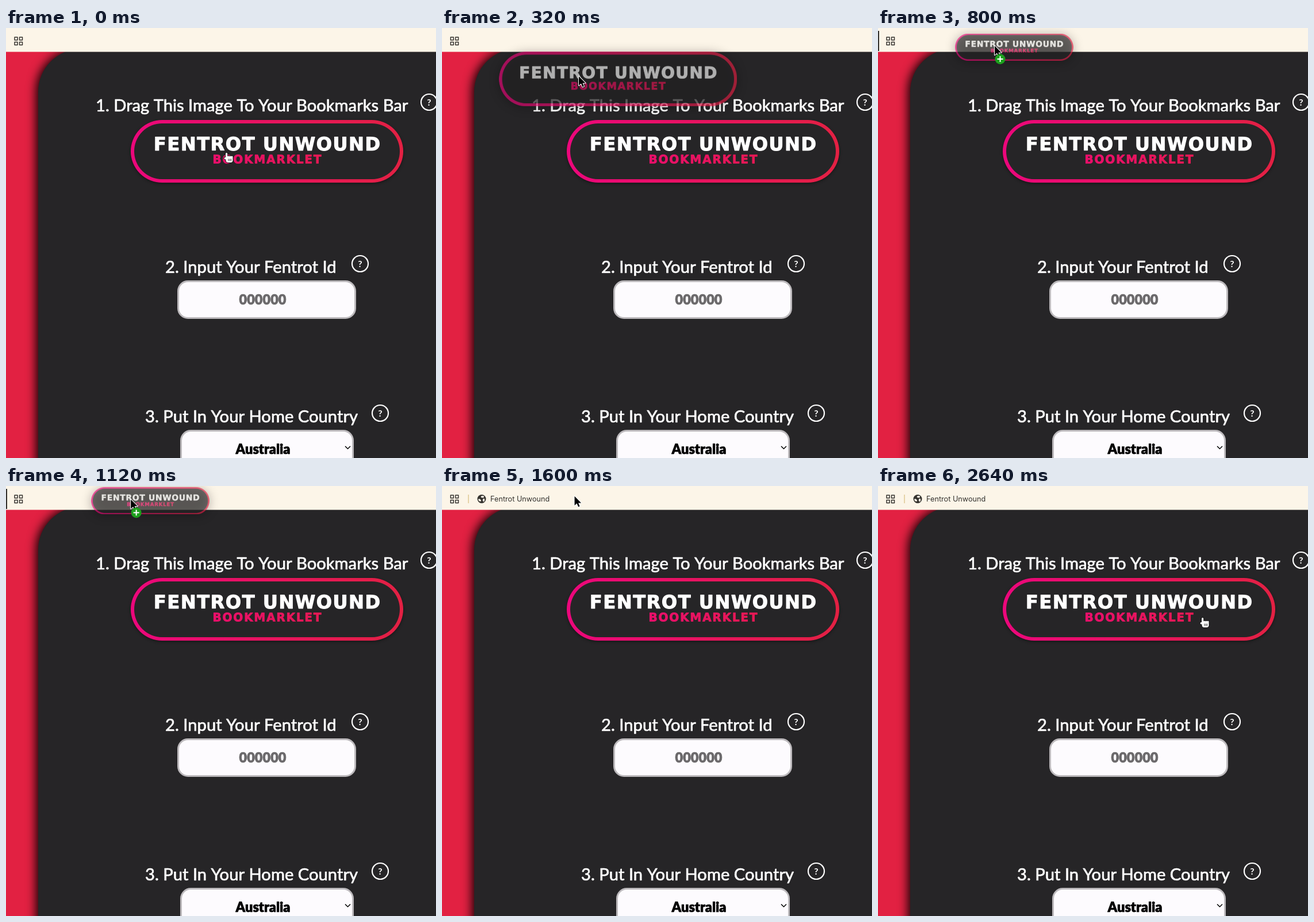
An HTML page with a canvas for the animation above (2720 ms loop, 748 by 748 pixels).

```html
<!DOCTYPE html>
<html lang="en">
<head>
<meta charset="utf-8">
<title>Drag to bookmarks bar</title>
<style>
  html, body { margin: 0; width: 100%; height: 100%; overflow: hidden; background: #262527; }
  canvas { display: block; width: 748px; height: 748px; }
</style>
</head>
<body>
<canvas id="stage" width="748" height="748"></canvas>
<script>
const ctx = document.getElementById('stage').getContext('2d');

const LOOP = 2720, STEP = 80;
const DRAG_START = 120, DROP = 1500;
const BAR_HEIGHT = 41.5;
const DARK = '#262527', CREAM = '#fcf5e8', INK = '#35332f';
const PILL = { x: 217, y: 160, w: 474, h: 109 };

const linear = k => k;
const easeIn = k => k ** 1.5;
const easeOut = k => 1 - (1 - k) ** 1.6;
const clamp = k => Math.min(1, Math.max(0, k));

// Pointer stops, each with the easing used to reach it
const STOPS = [
  { t: 80, x: 381, y: 217 },
  { t: 320, x: 238, y: 84, ease: linear },
  { t: 480, x: 203, y: 37, ease: easeOut },
  { t: 800, x: 203, y: 31, ease: linear },
  { t: 1280, x: 229, y: 17, ease: easeIn },
  { t: 1680, x: 231, y: 18, ease: linear },
  { t: 2160, x: 322, y: 166, ease: easeIn },
  { t: 2640, x: 562, y: 229, ease: easeOut }
];

function pointerAt(t) {
  const i = STOPS.findIndex(stop => stop.t >= t);
  if (i === 0) return STOPS[0];
  const from = STOPS[i - 1], to = STOPS[i];
  const k = to.ease((t - from.t) / (to.t - from.t));
  return { x: from.x + (to.x - from.x) * k, y: from.y + (to.y - from.y) * k };
}

const ghostScale = t => 1 - 0.566 * clamp((t - 160) / 640) ** 1.08;

function roundRect(c, x, y, w, h, r) {
  c.beginPath();
  c.roundRect(x, y, w, h, r);
}

function circle(x, y, r) {
  ctx.beginPath();
  ctx.arc(x, y, r, 0, Math.PI * 2);
}

function text(c, str, x, y, font, color, { align = 'center', spacing = 0, bolden = 0 } = {}) {
  c.font = font;
  c.fillStyle = c.strokeStyle = color;
  c.textAlign = align;
  c.letterSpacing = spacing + 'px';
  const left = align === 'center' ? x + spacing / 2 : x;
  c.fillText(str, left, y);
  if (bolden) {
    c.lineWidth = bolden;
    c.lineJoin = 'round';
    c.strokeText(str, left, y);
  }
  c.letterSpacing = '0px';
}

// The button is a sprite at double size, shared by page and drag image.
function makePill() {
  const sprite = document.createElement('canvas');
  sprite.width = PILL.w * 2;
  sprite.height = PILL.h * 2;
  const c = sprite.getContext('2d');
  c.scale(2, 2);
  const gradient = c.createLinearGradient(0, 0, PILL.w, 0);
  gradient.addColorStop(0, '#ec077c');
  gradient.addColorStop(1, '#e32143');
  roundRect(c, 3, 3, PILL.w - 6, PILL.h - 6, 51.5);
  c.fillStyle = DARK;
  c.fill();
  c.strokeStyle = gradient;
  c.lineWidth = 6;
  c.stroke();
  const wide = '"DejaVu Sans", Verdana, sans-serif';
  const middle = PILL.w / 2;
  text(c, 'FENTROT UNWOUND', middle, 53, `bold 32px ${wide}`, '#fff', { spacing: 1.6, bolden: 1.1 });
  text(c, 'BOOKMARKLET', middle, 75.5, `bold 20px ${wide}`, gradient, { spacing: 1.8, bolden: 0.8 });
  return sprite;
}
const pill = makePill();

function drawPill(x, y, scale, alpha, shadow, blur) {
  ctx.save();
  ctx.globalAlpha = alpha;
  ctx.shadowColor = shadow;
  ctx.shadowBlur = blur;
  ctx.shadowOffsetY = 2;
  ctx.imageSmoothingQuality = 'high';
  ctx.drawImage(pill, x, y, PILL.w * scale, PILL.h * scale);
  ctx.restore();
}

function drawPanel() {
  ctx.fillStyle = '#e22142';
  ctx.fillRect(0, 0, 748, 748);
  ctx.save();
  ctx.shadowColor = '#000';
  ctx.shadowBlur = 18;
  ctx.shadowOffsetX = -3;
  roundRect(ctx, 56, 36, 900, 900, 75);
  ctx.fillStyle = DARK;
  ctx.fill();
  ctx.restore();
}

function drawHeading(str, x, baseline, helpX) {
  text(ctx, str, x, baseline, '29.2px Lato, sans-serif', '#fff', { align: 'left', bolden: 0.7 });
  const helpY = baseline - 16;
  circle(helpX, helpY, 14);
  ctx.lineWidth = 2.2;
  ctx.stroke();
  text(ctx, '?', helpX, helpY + 6, 'bold 16px Lato, sans-serif', '#fff');
}

function drawField(x, y, w, value, color) {
  roundRect(ctx, x + 1.5, y + 1.5, w - 3, 64, 17);
  ctx.fillStyle = '#fdfbfe';
  ctx.fill();
  ctx.strokeStyle = '#bcb9bc';
  ctx.lineWidth = 3;
  ctx.stroke();
  text(ctx, value, x + w / 2 - 7, y + 42, '900 23.5px Lato, sans-serif', color, { bolden: 0.7 });
}

function drawForm() {
  drawHeading('1. Drag This Image To Your Bookmarks Bar', 156, 145, 736);
  drawPill(PILL.x, PILL.y, 1, 1, 'rgba(0,0,0,.4)', 5);
  drawHeading('2. Input Your Fentrot Id', 277, 426, 616);
  drawField(298, 439, 311, '000000', '#6b696b');
  drawHeading('3. Put In Your Home Country', 242, 686, 651);
  drawField(303, 699, 302, 'Australia', '#000');
  ctx.beginPath();
  ctx.moveTo(590, 727.5);
  ctx.lineTo(594.5, 732);
  ctx.lineTo(599, 727.5);
  ctx.lineWidth = 1.5;
  ctx.stroke();
}

function drawGlobe(x, y) {
  circle(x, y, 7.5);
  ctx.fillStyle = INK;
  ctx.fill();
  ctx.fillStyle = CREAM;
  for (const angle of [-1.2, 0.5, 2.6]) {
    ctx.beginPath();
    ctx.ellipse(x + 4 * Math.cos(angle), y + 4 * Math.sin(angle), 2.8, 1.7, angle + 1.2, 0, Math.PI * 2);
    ctx.fill();
  }
}

function drawBar(saved, inserting) {
  ctx.fillStyle = CREAM;
  ctx.fillRect(0, 0, 748, BAR_HEIGHT);
  ctx.strokeStyle = INK;
  ctx.lineWidth = 1.5;
  for (const x of [15, 23.5])
    for (const y of [16, 24.5]) ctx.strokeRect(x, y, 5, 5);
  if (inserting) {
    ctx.fillStyle = INK;
    ctx.fillRect(0, 5, 2, 35);
  }
  if (saved) {
    ctx.fillStyle = '#e6d3a8';
    ctx.fillRect(45, 15, 2, 15);
    drawGlobe(69, 22.5);
    text(ctx, 'Fentrot Unwound', 84, 27, '12.7px Inter, sans-serif', INK, { align: 'left' });
  }
}

function drawArrow() {
  const outline = new Path2D('M0 0V16L4 12.5L6.5 18.5L9 17.5L6.5 11.7H11.5Z');
  ctx.lineJoin = 'round';
  ctx.lineWidth = 2;
  ctx.strokeStyle = '#fff';
  ctx.stroke(outline);
  ctx.fillStyle = '#000';
  ctx.fill(outline);
}

function drawHand() {
  const hand = new Path2D();
  hand.roundRect(1.5, 7, 12, 10, 4);
  for (let finger = 0; finger < 4; finger++)
    hand.roundRect(1 + finger * 3.1, finger ? 5.5 : 0, 3.2, 9, 1.6);
  hand.roundRect(-1.5, 8, 5, 3.4, 1.7);
  ctx.lineWidth = 1.8;
  ctx.strokeStyle = '#111';
  ctx.stroke(hand);
  ctx.fillStyle = '#fff';
  ctx.fill(hand);
  ctx.fillStyle = '#222';
  for (let crease = 0; crease < 3; crease++) ctx.fillRect(5.5 + crease * 2.3, 10.5, 0.9, 4);
}

function drawPlus() {
  ctx.save();
  ctx.translate(9.5, 23);
  circle(0, 0, 9);
  ctx.fillStyle = '#1d9f1d';
  ctx.fill();
  ctx.fillStyle = '#fff';
  ctx.fillRect(-5, -1, 10, 2);
  ctx.fillRect(-1, -5, 2, 10);
  ctx.restore();
}

function render(t) {
  const pointer = pointerAt(t);
  const dragging = t > DRAG_START && t < DROP;
  const inserting = dragging && pointer.y < BAR_HEIGHT;
  const overPill = !dragging && pointer.y >= PILL.y;

  drawPanel();
  drawForm();
  drawBar(t >= DROP, inserting);

  if (dragging) {
    const scale = ghostScale(t);
    drawPill(pointer.x - PILL.w * scale * 0.335, pointer.y - PILL.h * scale * 0.45,
      scale, 0.65, 'rgba(0,0,0,.45)', 18);
  }

  ctx.save();
  ctx.translate(pointer.x, pointer.y);
  if (overPill) drawHand(); else drawArrow();
  if (inserting) drawPlus();
  ctx.restore();
}

function tick() {
  const t = performance.now() % LOOP;
  render(Math.floor(t / STEP) * STEP);
  requestAnimationFrame(tick);
}
tick();
</script>
</body>
</html>
```
